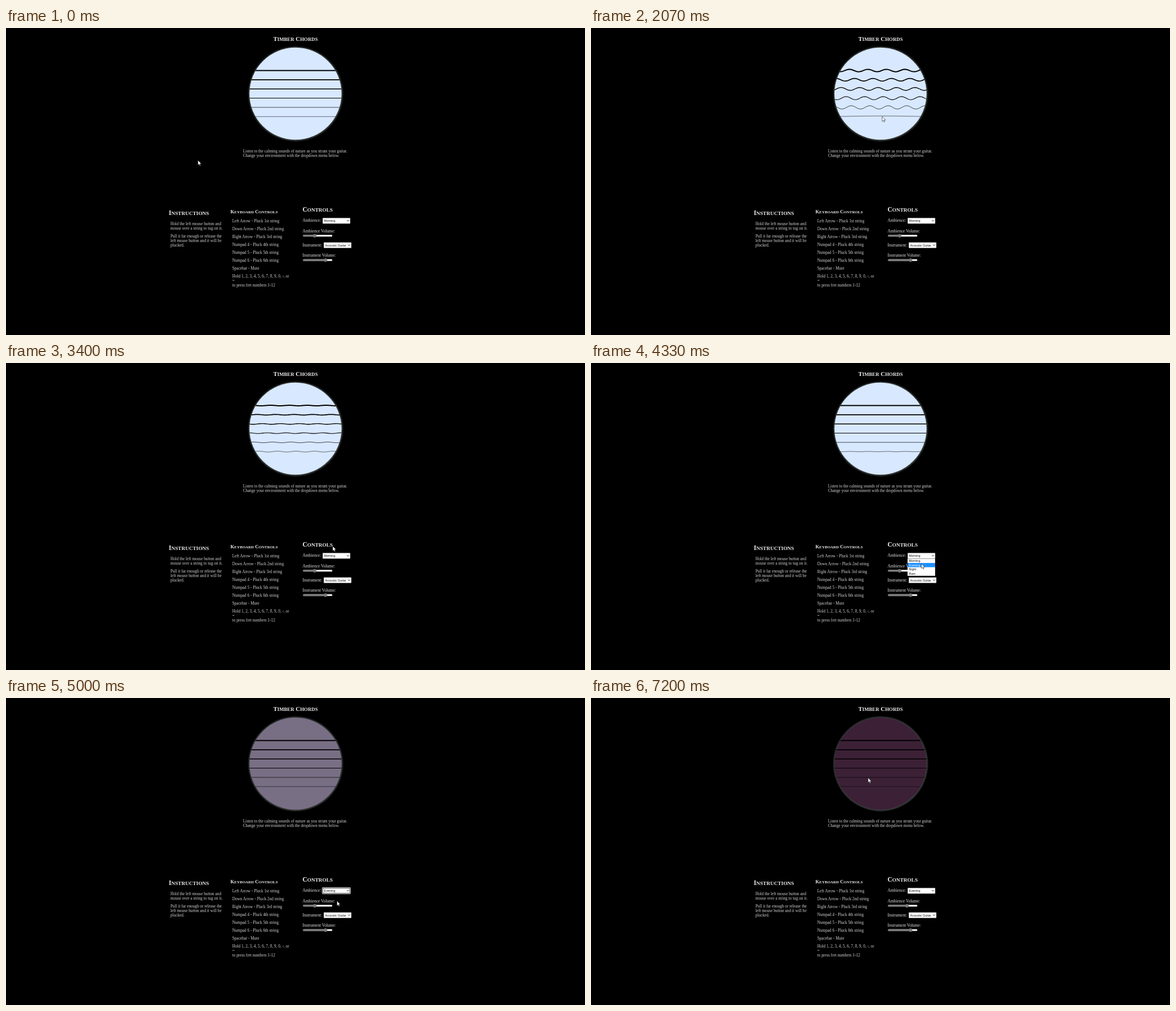
These frames come from a looping animation (1028 px wide and 545 px high, 7270 ms). An HTML page:

```html
<!DOCTYPE html>
<html lang="en">
<head>
<meta charset="utf-8">
<title>Strummable strings</title>
<style>
  html, body { margin: 0; width: 100%; height: 100%; overflow: hidden; background: #000; }
  svg { display: block; width: 1028px; height: 545px; }
  text { font-family: "Liberation Serif", serif; white-space: pre; }
  .head { font-weight: bold; fill: #ececec; }
  .body { font-size: 7.25px; fill: #d4d4d4; }
  .label { font-size: 7.5px; fill: #e2e2e2; }
  .ui { font-family: "Liberation Sans", sans-serif; font-size: 5.5px; fill: #111; }
</style>
</head>
<body>
<svg id="stage" viewBox="0 0 1028 545" xmlns="http://www.w3.org/2000/svg">
  <defs>
    <clipPath id="hole"><circle cx="514" cy="116.5" r="82"/></clipPath>
    <filter id="soft" x="-10%" y="-10%" width="120%" height="120%"><feGaussianBlur stdDeviation="1.1"/></filter>
  </defs>
  <rect width="1028" height="545"/>
  <circle cx="514.2" cy="116.8" r="83.6" fill="#3e4342" filter="url(#soft)"/>
  <circle id="disc" cx="514" cy="116.5" r="81.8"/>
  <g id="strings" clip-path="url(#hole)" fill="none" stroke="#000"></g>
  <g id="page"></g>
  <g id="menu"></g>
  <path id="cursor" d="M0 0V8.6L2 6.8L3.3 9.8L4.7 9.2L3.4 6.3H6Z" fill="#fff" stroke="#000" stroke-width=".55"/>
</svg>
<script>
const NS = "http://www.w3.org/2000/svg";
const LOOP = 7270, STEPS = 109;
const $ = id => document.getElementById(id);
const page = $("page"), menu = $("menu");

function add(parent, tag, attrs, content) {
  const el = document.createElementNS(NS, tag);
  for (const key in attrs) el.setAttribute(key, attrs[key]);
  if (content) el.textContent = content;
  parent.appendChild(el);
  return el;
}

const write = (cls, x, y, str, parent = page) => add(parent, "text", { class: cls, x, y }, str);

// Capitals with smaller capitals behind the first letter of each word.
function heading(x, y, size, str, anchor = "start") {
  const el = add(page, "text", { class: "head", x, y, "text-anchor": anchor });
  str.split(" ").forEach((word, i) => {
    add(el, "tspan", { "font-size": size }, (i ? " " : "") + word[0]);
    add(el, "tspan", { "font-size": size * 0.8 }, word.slice(1).toUpperCase());
  });
}

function select(x, y, str) {
  add(page, "rect", { x: x + 0.25, y: y + 0.25, width: 48.8, height: 9.9, rx: 0.6,
    fill: "#fff", stroke: "#777", "stroke-width": 0.5 });
  add(page, "path", { d: `M${x + 43.4} ${y + 4.2}l1.7 1.8l1.7 -1.8`, fill: "none",
    stroke: "#111", "stroke-width": 0.9 });
  return write("ui", x + 2.6, y + 7.1, str);
}

function slider(y) {
  const bar = { x: 527.4, y: y - 1.5, height: 3, rx: 1.5 };
  add(page, "rect", { ...bar, width: 52, fill: "#fff" });
  const fill = add(page, "rect", { ...bar, fill: "#777" });
  const thumb = add(page, "circle", { cy: y, r: 3.1, fill: "#777" });
  return x => {
    fill.setAttribute("width", x - 527.4);
    thumb.setAttribute("cx", x);
  };
}

heading(514, 22.8, 11, "Timber Chords", "middle");
write("body", 420.7, 220.9, "Listen to the calming sounds of nature as you strum your guitar.");
write("body", 420.7, 229.1, "Change your environment with the dropdown menu below.");

heading(289, 332, 11.6, "Instructions");
[[349.8, "Hold the left mouse button and"], [357.9, "mouse over a string to tug on it."],
 [371.8, "Pull it far enough or release the"], [380, "left mouse button and it will be"],
 [388.1, "plucked."]].forEach(([y, str]) => write("body", 292, y, str));

heading(398.6, 328.9, 8.7, "Keyboard Controls");
["Left Arrow - Pluck 1st string", "Down Arrow - Pluck 2nd string", "Right Arrow - Pluck 3rd string",
 "Numpad 4 - Pluck 4th string", "Numpad 5 - Pluck 5th string", "Numpad 6 - Pluck 6th string",
 "Spacebar - Mute", "Hold 1, 2, 3, 4, 5, 6, 7, 8, 9, 0, -, or"
].forEach((str, i) => write("body", 401.7, 345.4 + i * 13.95, str));
write("body", 401.7, 451, "=");
write("body", 401.7, 459.4, "to press fret numbers 1-12");

heading(526.4, 325.6, 11.6, "Controls");
write("label", 526.5, 344.4, "Ambience:");
write("label", 526.5, 362.5, "Ambience Volume:");
write("label", 526.5, 387.8, "Instrument:");
write("label", 526.5, 406.2, "Instrument Volume:");
const ambience = select(562, 337, "Morning");
select(564, 380.4, "Acoustic Guitar");
const setAmbienceVolume = slider(368.8);
slider(412.1)(567.3);

// Focus outline of the ambience box
const focus = add(page, "g", { fill: "none" });
add(focus, "rect", { x: 561.5, y: 336.4, width: 50, height: 11.2, rx: 1, stroke: "#fff", "stroke-width": 1 });
add(focus, "rect", { x: 562.4, y: 337.3, width: 48.2, height: 9.4, rx: 0.6, stroke: "#101010", "stroke-width": 0.8 });

// Open dropdown
const ROW = 7.5, MENU_Y = 347.5;
add(menu, "rect", { x: 562, y: MENU_Y, width: 49, height: ROW * 4 + 0.3, fill: "#fff" });
const mark = add(menu, "rect", { x: 562, width: 49, height: ROW, fill: "#1e90ff" });
const options = ["Morning", "Evening", "Night", "Rain"].map((str, i) =>
  write("ui", 564.6, MENU_Y + ROW * i + 5.7, str, menu));

// Strings, from thick to thin, each with the time of its pluck
const plucks = [1700, 1800, 1870, 1940, 2000, 2140];
const TUG = 135;
const strings = [2, 1.7, 1.35, 1.1, 0.7, 0.55].map(w => add($("strings"), "path", { "stroke-width": w }));

function stringPath(i, t) {
  const y0 = 75.5 + 16.35 * i, age = t - plucks[i];
  const swing = 3.2 * Math.exp(-age / 900);
  if (age < -TUG || swing < 0.25) return `M431 ${y0}H597`;
  let d = "";
  for (let x = 431; x <= 597; x += 2) {
    const dy = age < 0
      ? -2.3 * (1 + age / TUG) * Math.sin(Math.PI * (x - 431) / 166)
      : -swing * Math.cos(2 * Math.PI * ((x - 459 - 9 * i) / 32.8 - (t - 2070) / 400));
    d += (d ? "L" : "M") + x + " " + (y0 + dy).toFixed(2);
  }
  return d;
}

// Pointer path: time, x, y
const track = [
  [0, 340.8, 234.8], [270, 312.5, 287], [400, 345, 262], [735, 465, 154.5], [1000, 490, 92],
  [1200, 499, 61.6], [1470, 501, 66], [1600, 503, 70], [1700, 505, 78], [2070, 517, 157.6],
  [2200, 519, 167], [2600, 524, 175], [2935, 536, 198], [3400, 580, 325], [3670, 587, 338],
  [3800, 587, 340], [4330, 586.5, 356], [4640, 586.5, 356], [4870, 587, 357.6], [5330, 589, 367],
  [5470, 589, 376], [5735, 589, 376], [5800, 585, 363.5], [5930, 582, 386.5], [6130, 568, 267],
  [6330, 552, 350], [6470, 555.3, 368], [6540, 556.5, 368.6], [6670, 558, 369], [6735, 561, 369],
  [6800, 561, 369], [7200, 492, 141.6], [LOOP, 492, 141.6]
];

function pointer(t) {
  const i = Math.max(1, track.findIndex(p => p[0] >= t));
  const [t0, x0, y0] = track[i - 1], [t1, x1, y1] = track[i];
  const f = (t - t0) / (t1 - t0);
  return [x0 + (x1 - x0) * f, y0 + (y1 - y0) * f];
}

// Same curve as the CSS keyword "ease"
function ease(p) {
  if (p <= 0) return 0;
  if (p >= 1) return 1;
  const curve = (a, b, u) => 3 * a * u * (1 - u) ** 2 + 3 * b * u * u * (1 - u) + u ** 3;
  let lo = 0, hi = 1;
  for (let n = 0; n < 20; n++) {
    const mid = (lo + hi) / 2;
    if (curve(0.25, 0.25, mid) < p) lo = mid; else hi = mid;
  }
  return curve(0.1, 1, lo);
}

const morning = [216, 232, 255], evening = [60, 33, 54];
const show = (el, on) => el.setAttribute("visibility", on ? "visible" : "hidden");

function draw(t) {
  const [x, y] = pointer(t);
  $("cursor").setAttribute("transform", `translate(${x} ${y})`);

  const fade = ease((t - 4650) / 1000);
  const rgb = morning.map((c, i) => Math.round(c + (evening[i] - c) * fade));
  $("disc").setAttribute("fill", `rgb(${rgb})`);
  strings.forEach((el, i) => el.setAttribute("d", stringPath(i, t)));

  const chosen = t >= 4650;
  ambience.textContent = chosen ? "Evening" : "Morning";
  show(focus, chosen && t < 6660);

  const row = Math.min(3, Math.max(0, Math.floor((y - MENU_Y) / ROW)));
  show(menu, t >= 3725 && !chosen);
  mark.setAttribute("y", MENU_Y + row * ROW);
  options.forEach((el, i) => el.style.fill = i === row ? "#fff" : "#111");

  setAmbienceVolume(t < 6660 ? 548 : t < 6725 ? 558 : 561);
}

const start = performance.now();
function tick(now) {
  const t = Math.max(0, now - start) % LOOP;
  const step = Math.min(STEPS - 1, Math.floor(t * STEPS / LOOP + 0.1));
  draw(step * LOOP / STEPS);
  requestAnimationFrame(tick);
}
draw(0);
requestAnimationFrame(tick);
</script>
</body>
</html>
```
